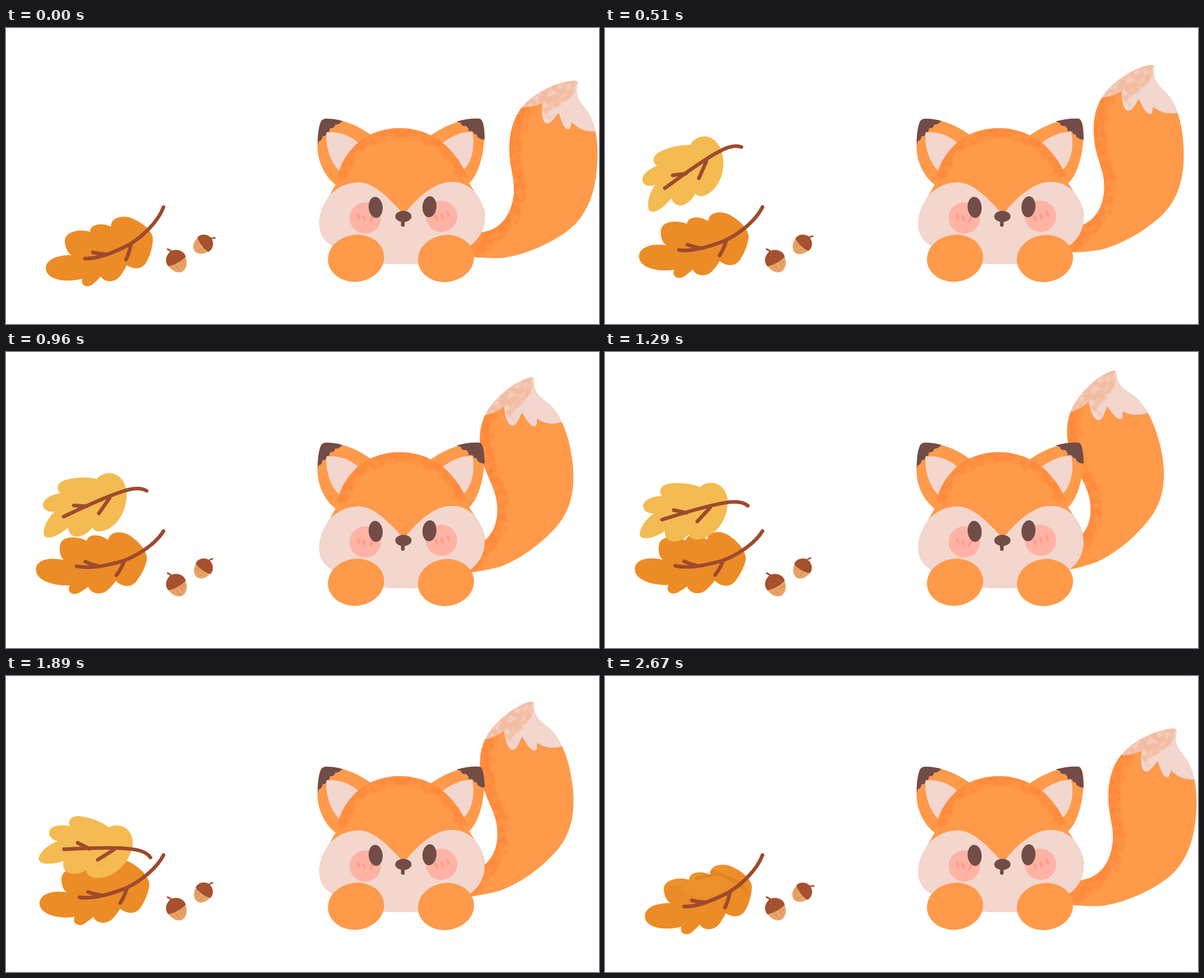
An HTML page for the animation above (2700 ms loop, 1058x529 px).

```html
<!DOCTYPE html>
<html lang="en">
<head>
<meta charset="utf-8">
<title>Autumn fox</title>
<style>
  html, body { margin: 0; width: 100%; height: 100%; overflow: hidden; background: #fff; }
  svg { display: block; width: 100vw; height: 100vh; }
  .orange { fill: #fe9a4a; }
  .cream { fill: #f3d6ce; }
  .brown { fill: #724c46; }
  .shade { fill: none; stroke: #ff8a3c; filter: url(#rough); }
  .vein { fill: none; stroke: #9f4a2d; stroke-width: 6.5; stroke-linecap: round; stroke-linejoin: round; }
  .blush { fill: #ffb3a4; }
  .marks { fill: none; stroke: #ff9d8a; stroke-width: 4.5; stroke-linecap: round; }
</style>
</head>
<body>
<svg viewBox="0 0 1058 529" preserveAspectRatio="none">
  <defs>
    <filter id="rough" x="-20%" y="-20%" width="140%" height="140%" color-interpolation-filters="sRGB">
      <feTurbulence type="fractalNoise" baseFrequency=".09" numOctaves="3" seed="4" result="noise"/>
      <feDisplacementMap in="SourceGraphic" in2="noise" scale="22" xChannelSelector="R" yChannelSelector="G"/>
      <feGaussianBlur stdDeviation="1.5" result="edge"/>
      <feColorMatrix in="noise" values="0 0 0 0 0  0 0 0 0 0  0 0 0 0 0  0 0 2.4 0 -.35" result="grain"/>
      <feComposite in="edge" in2="grain" operator="in"/>
    </filter>

    <path id="tailShape" d="M1020 97C1021 94 1013 94 1005 95C978 99 942 117 922 140C903 163 898 190 898 220C899 250 908 270 906 295C904 322 892 350 865 361C850 366 835 368 810 372L800 402C825 409 850 412 885 411C930 405 972 384 1000 364C1038 336 1055.500 290 1055.500 222C1055 195 1051 175 1041 155C1032 139 1018 130 1018 112C1018 106 1020 102 1020 97Z"/>
    <path id="tipShape" d="M915 141Q938 143 957 134C955 150 956 170 965 171C973 171 979 160 986 152C990 163 994 180 1003 181C1008 181 1007 175 1010 169C1020 180 1036 188 1058 184L1045 80H930Z"/>
    <path id="headShape" d="M572 308L588 280C597 222 640 179 702 179C765 179 810 222 826 277L841 300C850 312 854 325 854 338C854 360 845 380 820 395C790 414 750 423 705 422C655 422 615 412 590 393C570 385 559 370 559 350C559 335 564 320 572 308Z"/>
    <path id="orangeShape" d="M262 375C259 360 242 347 222 339C208 335 188 337 187 355C172 347 150 350 150 364C132 359 106 363 105 380C105 392 110 402 117 406C95 405 71 412 71 430C73 452 110 455 136 448C132 462 148 466 157 456C161 452 165 449 169 444C177 457 197 455 206 440C210 434 213 430 215 424C228 432 243 432 251 418C258 404 262 390 262 375Z"/>

    <clipPath id="tailClip"><use href="#tailShape"/></clipPath>
    <clipPath id="tipClip"><use href="#tipShape"/></clipPath>
    <clipPath id="headClip"><use href="#headShape"/></clipPath>
    <clipPath id="orangeClip"><use id="orangeCut" href="#orangeShape"/></clipPath>

    <g id="yellowLeaf">
      <path fill="#f3bb51" d="M223 284C222 262 208 251 192 252Q184 252 177 257C163 248 140 243 122 243C108 244 102 254 108 263C90 261 72 266 72 278Q74 290 89 292C72 301 59 316 59 328C64 339 88 334 104 326C102 340 110 347 121 347C133 347 140 342 146 338C147 347 156 350 168 349C196 346 222 316 223 284Z"/>
      <path class="vein" d="M102 305C140 299 180 292 215 291C236 290 250 294 257 302M190 296L164 317M147 299L125 291"/>
    </g>

    <g id="acorn">
      <path fill="#e8a468" d="M-17 -2C-18 12 -9 21 -1 22C8 22 18 12 17 -2Z"/>
      <path fill="none" stroke="#c98248" stroke-width="1" d="M-5 6Q-6 12 -3 18M5 5L4 14M11 5L9 12"/>
      <path fill="none" stroke="#a6502e" stroke-width="3" stroke-linecap="round" d="M0 -18Q-1 -23 -4 -26"/>
      <path fill="#a6502e" d="M-18 1C-20 -12 -8 -20 0 -20C8 -20 20 -12 18 1C10 5 -10 5 -18 1Z"/>
      <path stroke="#c4703f" stroke-width="1.4" stroke-linecap="round" d="M-9 -7h.1M-2 -12h.1M6 -8h.1M1 -3h.1M11 -3h.1"/>
    </g>
  </defs>

  <g id="tail">
    <use href="#tailShape" class="orange"/>
    <g clip-path="url(#tailClip)">
      <path class="shade" stroke-width="42" d="M926 130C888 180 896 230 902 265C908 320 890 350 850 374L820 400"/>
      <g clip-path="url(#tipClip)">
        <use href="#tipShape" class="cream"/>
        <path fill="#f3bb9f" filter="url(#rough)" d="M900 150L958 140L962 158L982 138L1004 128L1018 106L1026 80H920Z"/>
      </g>
    </g>
  </g>

  <use id="yellowBack" href="#yellowLeaf"/>
  <g id="orange">
    <use href="#orangeShape" fill="#ec8c27"/>
    <path class="vein" d="M281 320C272 345 245 372 220 387C195 400 165 413 141 412M223 386Q220 402 214 414M177 404Q166 404 155 401"/>
  </g>
  <g clip-path="url(#orangeClip)"><use id="yellowFront" href="#yellowLeaf"/></g>

  <use href="#acorn" transform="translate(304.5 416) rotate(-29)"/>
  <use id="smallAcorn" href="#acorn"/>

  <path class="orange" d="M562 167Q565 162 572 162C603 163 629 175 652 192L600 290L588 280C565 262 554 232 556 205Q557 180 562 167Z"/>
  <path class="orange" d="M758 192C785 172 818 162 845 162Q851 164 853 176C856 200 850 255 826 278L800 285Z"/>
  <path class="cream" d="M572 187C592 184 615 192 629 206L598 258C584 249 569 218 572 187Z"/>
  <path class="cream" d="M832 186C815 184 793 194 778 206L817 253C833 237 837 208 832 186Z"/>
  <path class="brown" d="M562 167Q565 162 572 162Q586 162 600 166Q595 173 587 173Q586 180 578 179Q578 187 572 186Q571 195 565 193Q563 203 558 202L556 209Q556 180 562 167Z"/>
  <path class="brown" d="M804 167Q825 161 845 162Q853 163 854 199Q846 200 841 194Q840 188 836 190Q832 181 826 185Q825 177 820 175Q812 176 812 170Z"/>

  <use href="#headShape" class="orange"/>
  <g clip-path="url(#headClip)">
    <path class="shade" stroke-width="30" d="M592 268C602 218 642 180 702 180C762 180 804 218 822 268"/>
    <path class="cream" d="M556 328C575 292 602 276 629 276C656 276 681 302 705 328H714C735 302 765 275 795 275C822 275 838 290 850 313L870 440H540Z"/>
  </g>
  <circle class="blush" cx="641" cy="339.5" r="28"/>
  <circle class="blush" cx="777" cy="336.5" r="28"/>
  <path class="marks" d="M628 334l2 6M638 337l2 6M653 338l-3 8M766 336l3 7M777 333l2 7M788 329l2 6"/>
  <ellipse class="brown" cx="659.5" cy="320.5" rx="12.5" ry="18.7" transform="rotate(-5 659.5 320.5)"/>
  <ellipse class="brown" cx="755.5" cy="319.5" rx="12.5" ry="18.7" transform="rotate(5 755.5 319.5)"/>
  <ellipse class="brown" cx="709" cy="336.7" rx="14.5" ry="10"/>
  <path d="M708 344V352" stroke="#724c46" stroke-width="6.5" stroke-linecap="round"/>
  <ellipse class="orange" cx="624.5" cy="411.5" rx="50.2" ry="42" transform="rotate(-8 624.5 411.5)"/>
  <ellipse class="orange" cx="785" cy="412" rx="50.2" ry="42" transform="rotate(-8 785 412)"/>
</svg>
<script>
  const STEP = 30, COUNT = 90, LAST = COUNT - 1, FADE = 9;
  const byId = id => document.getElementById(id);
  const pose = (id, transform) => byId(id).setAttribute('transform', transform);

  // Rises linearly to 1 at the peak step, then falls back to 0 at the last one.
  const swing = (step, peak) => step < peak ? step / peak : (LAST - step) / (LAST - peak);

  function draw(ms) {
    const step = Math.floor(ms / STEP) % COUNT;
    const tailAngle = 20.3 * swing(step, 49);
    pose('tail', `rotate(${-tailAngle} 766 412)`);
    pose('smallAcorn', `translate(352 386.5) rotate(${53 - 1.3 * tailAngle}) scale(-.9 .9)`);

    const leafTurn = `rotate(${13.1 * swing(step, 37)} 281 320)`;
    pose('orange', leafTurn);
    pose('orangeCut', leafTurn);

    const fall = step - 54;
    const drift = `translate(0 ${1.482 * fall}) rotate(${0.735 * fall} 179 313)`;
    const alpha = Math.min(1, step / FADE, (COUNT - step) / FADE);
    pose('yellowBack', drift);
    pose('yellowFront', drift);
    byId('yellowFront').setAttribute('opacity', alpha);
    // Over the empty background the leaf switches hard instead of fading.
    byId('yellowBack').setAttribute('visibility', alpha >= 0.5 ? 'visible' : 'hidden');
  }

  const start = performance.now();
  function tick(now) {
    draw(Math.max(0, now - start));
    requestAnimationFrame(tick);
  }
  draw(0);
  requestAnimationFrame(tick);
</script>
</body>
</html>
```
